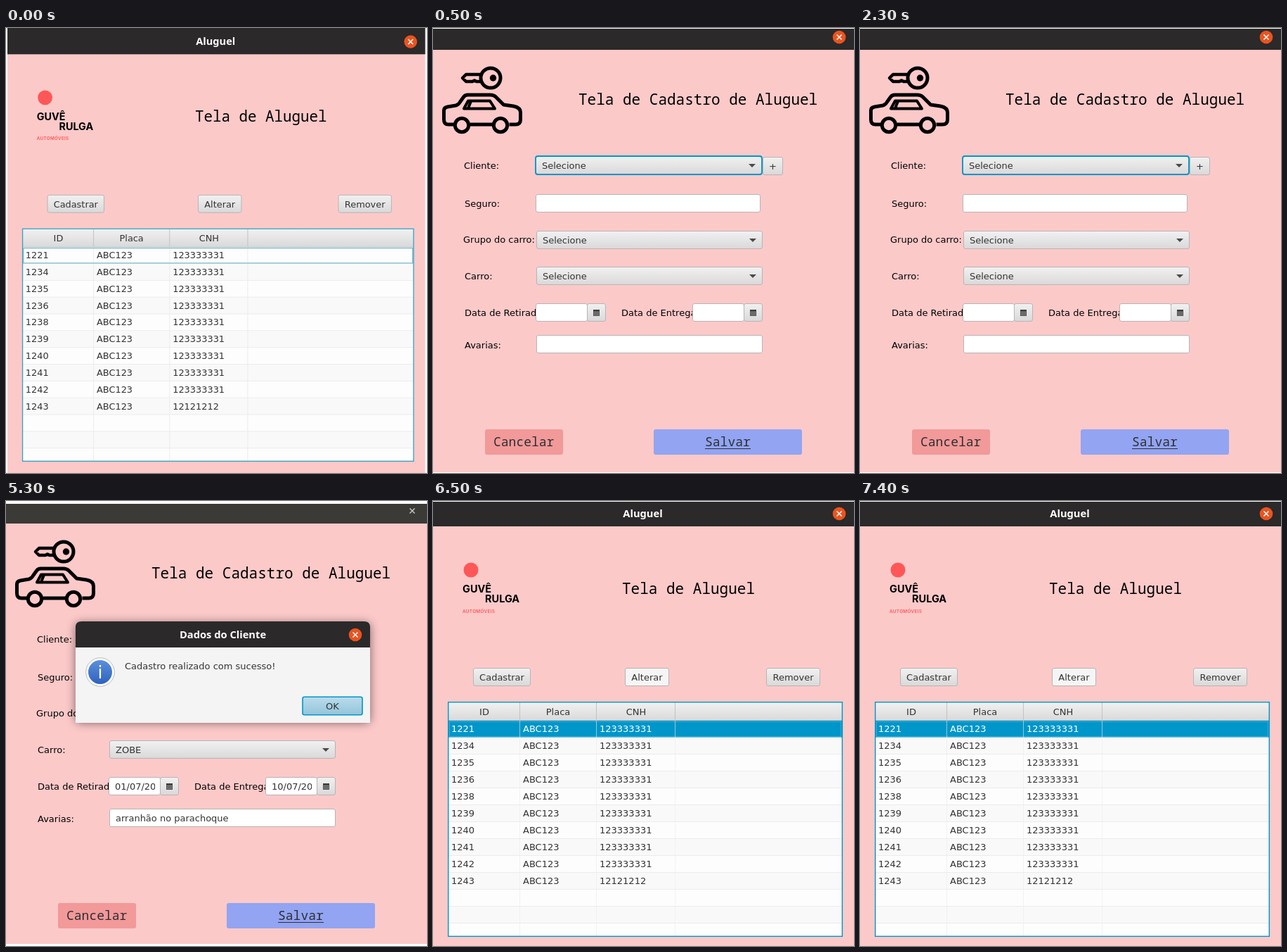
An HTML page that plays this animation: 599x632 px, repeating every 8 s.

```html
<!DOCTYPE html>
<html lang="pt">
<head>
<meta charset="utf-8">
<title>Aluguel</title>
<style>
  html, body { margin: 0; width: 100%; height: 100%; overflow: hidden; background: #fff; }
  svg { display: block; }
  text { font: 13px "DejaVu Sans", sans-serif; fill: #333; white-space: pre; }
  .mid { text-anchor: middle; }
  .label { fill: #000; }
  .title { font: 21px "Noto Sans Mono", monospace; fill: #000; }
  .action { font: 18px "Noto Sans Mono", monospace; fill: #2e2e33; }
  .bar { font: bold 14.7px "Noto Sans", sans-serif; fill: #fff; text-anchor: middle; }
  .brand { font: bold 14.5px Inter, sans-serif; fill: #000; }
  .tag { font: 600 6.4px Inter, sans-serif; fill: #ff5757; letter-spacing: .3px; }
  .info { font: 25px "DejaVu Sans", sans-serif; fill: #fff; text-anchor: middle; }
  .on { fill: #fff; }
</style>
</head>
<body>
<svg id="stage" width="599" height="632" viewBox="0 0 599 632"></svg>
<script>
const PINK = '#fcc9c9', DARK = '#2b2929', BLUE = '#0096c9';

const rect = (x, y, w, h, fill, extra = '') =>
  `<rect x="${x}" y="${y}" width="${w}" height="${h}" fill="${fill}" ${extra}/>`;
const text = (x, y, str, cls = '') => `<text x="${x}" y="${y}" class="${cls}">${str}</text>`;
const path = (d, stroke, width = 1, extra = 'fill="none"') =>
  `<path d="${d}" stroke="${stroke}" stroke-width="${width}" ${extra}/>`;
const circle = (x, y, r, fill, extra = '') => `<circle cx="${x}" cy="${y}" r="${r}" fill="${fill}" ${extra}/>`;
const group = (transform, content) => `<g transform="${transform}">${content}</g>`;

const box = (x, y, w, h, fill, stroke = '#b8b4b4') =>
  rect(x + .5, y + .5, w - 1, h - 1, fill, `rx="2.5" stroke="${stroke}"`);
const cross = (x, y, color) => path(`M${x - 3.5} ${y - 3.5}l7 7m0-7l-7 7`, color, 1.5);
const closeButton = (x, y) => circle(x, y, 9.3, '#e95420') + cross(x, y, '#fff');
const button = (x, y, w, label, fill = 'url(#soft)') =>
  box(x, y, w, 26, fill) + text(x + w / 2, y + 18, label, 'mid');

function combo(x, y, w, value, focused) {
  const ring = focused ? rect(x, y, w, 26, 'none', `rx="3" stroke="${BLUE}" stroke-width="1.8"`) : '';
  return box(x, y, w, 26, 'url(#soft)') + ring + text(x + 9, y + 18, value) +
    `<path d="M${x + w - 19} ${y + 11}h10l-5 5z" fill="#4a4a4a"/>`;
}

const field = (x, y, w, value = '') =>
  box(x, y, w, 26, '#fff') +
  `<svg x="${x + 9}" y="${y}" width="${w - 17}" height="26">${text(0, 18, value)}</svg>`;

const dateField = (x, y, value) =>
  box(x + 73, y, 27, 26, 'url(#soft)') + field(x, y, 74, value) +
  rect(x + 82, y + 9, 9, 9, '#444') +
  path(`M${x + 83} ${y + 12.5}h7m-7 2h7m-7 2h7`, '#ddd', 1, 'stroke-dasharray="1 1"');

function listScreen(selected) {
  const edges = [123.5, 232.5, 344.5];
  let out = rect(-5, 1, 610, 640, PINK) + rect(-5, selected ? 1 : -5, 610, selected ? 35 : 41, DARK) +
    text(298.5, 23, 'Aluguel', 'bar') + closeButton(578, 18) +
    circle(54, 98, 10.5, '#ff5757') +
    text(42, 130, 'GUVÊ', 'brand') + text(74, 144, 'RULGA', 'brand') + text(42, 159, 'AUTOMÓVEIS', 'tag') +
    text(269, 132, 'Tela de Aluguel', 'title') +
    button(57, 237, 82, 'Cadastrar') +
    button(273, 237, 63, 'Alterar', selected ? '#f5f5f5' : undefined) +
    button(474, 237, 77, 'Remover') +
    rect(21, 285, 562, 334, '#fdfdfd') + rect(22, 286, 560, 26, 'url(#soft)');

  for (let i = 0; i < 13; i++) {
    const y = 312 + 24 * i;
    out += rect(22, y, 560, Math.min(24, 618 - y), i % 2 ? '#f9f9f9' : '#fdfdfd') +
      path(`M22 ${y - .5}h560`, i ? '#ececec' : '#c4c4c4');
  }
  if (selected) out += rect(22, 312, 560, 23.5, BLUE) + rect(23.5, 313.5, 557, 21, 'none', 'stroke="#35abd6"');
  for (const x of edges) {
    out += path(`M${x} 286v25.5`, '#c2c2c2') + path(`M${x} 312v306`, '#ececec', 1, selected ? 'opacity=".6"' : '');
  }
  if (!selected) out += rect(23, 313.3, 558, 21.5, 'none', 'stroke="#58aabf"');
  out += rect(21.7, 285.7, 560.6, 332.6, 'none', `stroke="${selected ? BLUE : '#3d9fbd'}" stroke-width="1.4"`) +
    text(73, 304, 'ID', 'mid') + text(178, 304, 'Placa', 'mid') + text(289, 304, 'CNH', 'mid');

  [1221, 1234, 1235, 1236, 1238, 1239, 1240, 1241, 1242, 1243].forEach((id, i) => {
    const y = 328 + 24 * i, cls = selected && !i ? 'on' : '';
    out += text(26, y, id, cls) + text(128, y, 'ABC123', cls) +
      text(237, y, i < 9 ? '123333331' : '12121212', cls);
  });
  return out;
}

const carIcon =
  circle(82, 71, 14, 'none', 'stroke="#000" stroke-width="5"') + circle(85.5, 71, 4.7, '#000') +
  path('M68 66H47l-5 5 5 5h9l3-1.5 3 1.5h6', '#000', 4.5, 'fill="none" stroke-linejoin="round"') +
  path('M30 137h-8q-6.500 0-6.500-7v-13q0-4 5-5l12-2q4-1 6-5l5-7q2-3 6-3h32q5 0 8 3l11 11 14 2q10 2 10 9v10q0 7-7 7h-9M53 137h32',
    '#000', 5, 'fill="none" stroke-linejoin="round"') +
  path('M44 114.500l6-11h31l7 11zM54 104l-4 10', '#000', 4, 'fill="none" stroke-linejoin="round"') +
  circle(41, 138, 9.7, PINK, 'stroke="#000" stroke-width="5"') +
  circle(96, 138, 9.7, PINK, 'stroke="#000" stroke-width="5"');

const formScreen = (car, pickup, dropoff, damage) =>
  rect(0, 1, 599, 630, PINK) + carIcon +
  text(207, 109, 'Tela de Cadastro de Aluguel', 'title') +
  [[44, 200, 'Cliente:'], [45, 254, 'Seguro:'], [43, 305, 'Grupo do carro:'], [45, 357, 'Carro:'],
   [45, 409, 'Data de Retirada:'], [268, 409, 'Data de Entrega:'], [45, 455, 'Avarias:']]
    .map(([x, y, s]) => text(x, y, s, 'label')).join('') +
  combo(146, 182, 322, 'Selecione', true) + button(469, 183, 29, '+') +
  field(146, 236, 320) + combo(147, 288, 322, 'Selecione') + combo(147, 339, 322, car) +
  dateField(146, 391, pickup) + dateField(369, 391, dropoff) + field(147, 436, 322, damage) +
  rect(74, 570, 111, 36, '#f29999', 'rx="3"') + text(86, 594, 'Cancelar', 'action') +
  rect(314, 570, 211, 36, '#92a4f2', 'rx="3"') + text(387, 594, 'Salvar', 'action') +
  path('M387 597.5h65', '#2e2e33');

const dialog =
  rect(99, 173, 419, 142, '#000', 'rx="6" opacity=".5" filter="url(#blur)"') +
  `<path d="M99 315V179q0-8 8-8h403q8 0 8 8v136z" fill="#f4f4f4"/>` +
  `<path d="M99 208v-29q0-8 8-8h403q8 0 8 8v29z" fill="${DARK}"/>` +
  text(308.5, 195, 'Dados do Cliente', 'bar') + closeButton(497, 190) +
  circle(134, 243, 20.3, '#fff', 'stroke="#bbb"') + circle(134, 243, 17, 'url(#sphere)') +
  text(134, 252, 'i', 'info') +
  text(169, 239, 'Cadastro realizado com sucesso!') +
  rect(422, 278.3, 85, 25.5, 'url(#ok)', `rx="2.5" stroke="${BLUE}" stroke-width="1.6"`) +
  text(464.5, 296, 'OK', 'mid');

const gradient = (id, top, bottom) =>
  `<linearGradient id="${id}" x2="0" y2="1"><stop stop-color="${top}"/><stop offset="1" stop-color="${bottom}"/></linearGradient>`;

const scenes = [
  [0, group('translate(2 1.6) scale(.9925)', listScreen(false)) +
    rect(0, 0, 2, 632, '#fff') + rect(596.5, 0, 3, 632, '#fff')],
  [500, formScreen('Selecione') + rect(0, 1, 599, 30, DARK) + closeButton(578, 13)],
  [3500, group('translate(0 1)', formScreen('ZOBE', '01/07/2021', '10/07/2021', 'arranhão no parachoque')) +
    rect(0, 0, 599, 4, '#fff') + rect(0, 4, 599, 28, '#3b3a37') + cross(578, 14, '#c4c2bf') +
    rect(0, 629, 599, 3, '#fff') + dialog],
  [6500, listScreen(true) + rect(0, 0, 599, 1, '#fff')]
];

const stage = document.getElementById('stage');
stage.innerHTML =
  `<defs>${gradient('soft', '#f1f1f1', '#d9d9d9')}${gradient('ok', '#b9dcec', '#94c4da')}${gradient('sphere', '#5b8fdc', '#2f62bd')}
  <filter id="blur" x="-20%" y="-30%" width="140%" height="160%"><feGaussianBlur stdDeviation="7"/></filter></defs>` +
  scenes.map(([, content]) => `<g class="scene" visibility="hidden">${content}</g>`).join('');
const layers = stage.querySelectorAll('.scene');

const begin = performance.now();
function draw() {
  const t = (performance.now() - begin) % 8000;
  const current = scenes.filter(([start]) => t >= start).length - 1;
  layers.forEach((layer, i) => layer.setAttribute('visibility', i === current ? 'visible' : 'hidden'));
  requestAnimationFrame(draw);
}
draw();
</script>
</body>
</html>
```
